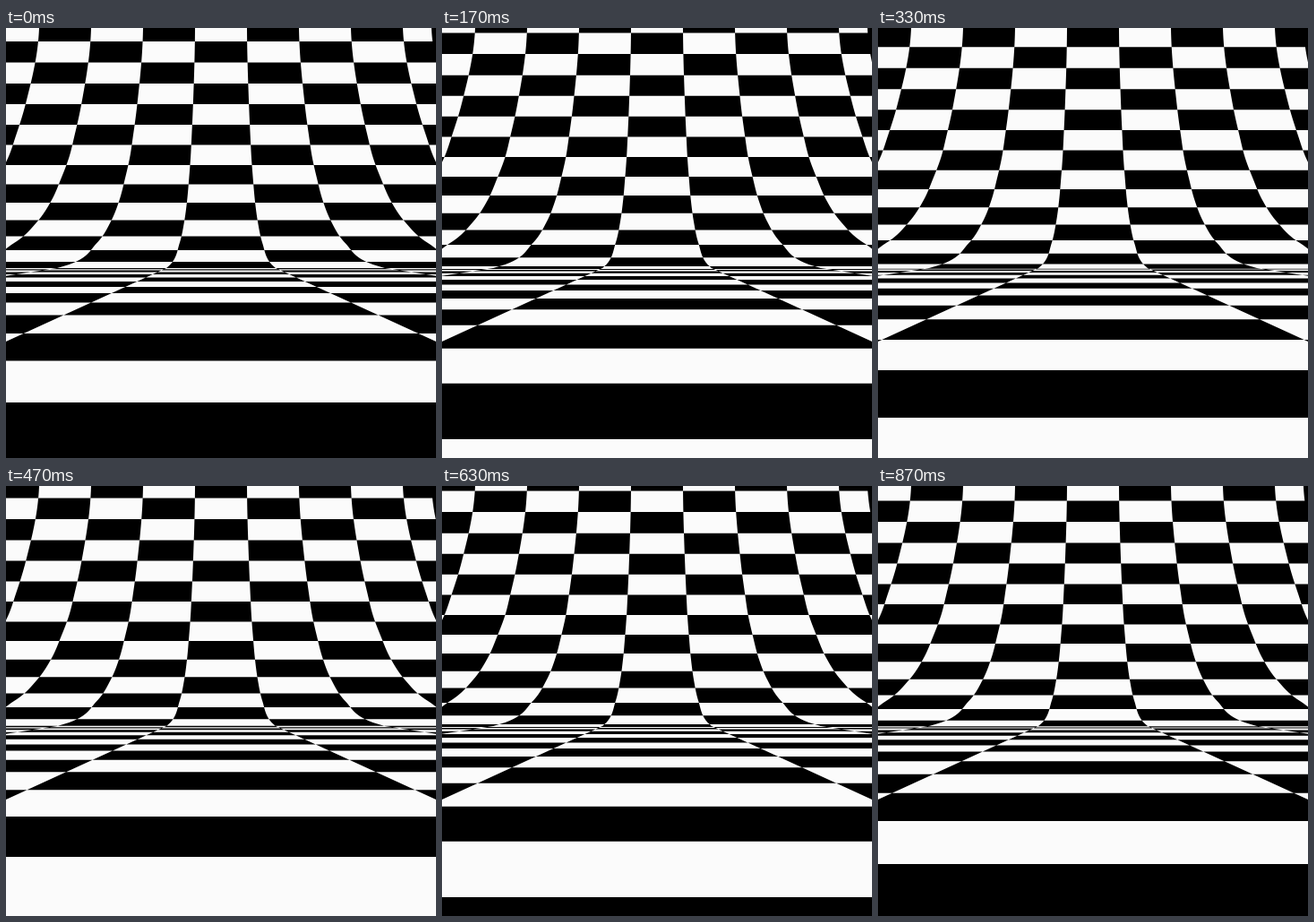
Animation of 480 by 480 pixels, one loop 0.91 s. Source, as an HTML page with a canvas:

```html
<!DOCTYPE html>
<html>
<head>
<meta charset="utf-8">
<style>
html, body { margin: 0; height: 100%; overflow: hidden; background: #000; }
canvas { display: block; }
</style>
</head>
<body>
<canvas id="stage" width="480" height="480"></canvas>
<script>
const SIZE = 480, CENTER = 240, LOOP = 910, STEPS = 27, POSES = 30;
const ctx = document.getElementById('stage').getContext('2d');

// Screen height of each row edge, from the top of the wall to the near floor.
const FIRST_ROW = -28;
const ROW_Y = [
  -32, -8.5, 15, 38.5, 62, 85, 108, 130.5, 153, 174.5, 195, 214.5, 232.5, 248, 261,
  268, 269.3, 270.5, 272.4, 275, 278.5, 283, 289, 296, 306.5, 320.5, 341, 371.5, 418, 491.5, 590
];

// Half a column's width on the wall, every 24 px down.
const WALL_STEP = 24, WALL_END = 264;
const WALL_W = [29, 29.3, 29.9, 30.7, 31.6, 32.7, 33.9, 35.7, 37.8, 41, 46.2, 56.5, 90];

function spline(points, pos) {
  const last = points.length - 1;
  const i = Math.max(0, Math.min(last - 1, Math.floor(pos)));
  const t = pos - i;
  const a = points[Math.max(0, i - 1)], b = points[i];
  const c = points[i + 1], d = points[Math.min(last, i + 2)];
  return b + t * ((c - a) / 2 + t * (a - 2.5 * b + 2 * c - d / 2 + t * (1.5 * (b - c) + (d - a) / 2)));
}

const rowY = row => spline(ROW_Y, row - FIRST_ROW);

function halfWidth(y) {
  if (y < WALL_END) return spline(WALL_W, y / WALL_STEP);
  return Math.max(61 + (y - 268) * 2.183, 56.5 + (y - WALL_END) * 1.1);
}

// Closed strip between two multiples of the half width.
function strip(path, inner, outer) {
  for (let y = 0; y <= SIZE; y += 2) {
    path.lineTo(CENTER + inner * halfWidth(y), y);
  }
  for (let y = SIZE; y >= 0; y -= 2) {
    path.lineTo(CENTER + outer * halfWidth(y), y);
  }
  path.closePath();
}

const columns = new Path2D();
for (const side of [-1, 1]) {
  for (const edge of [1, 5]) strip(columns, side * edge, side * (edge + 2));
}
const beyondSheet = new Path2D();
strip(beyondSheet, 8.1, 12);

function draw(shift) {
  ctx.fillStyle = '#000';
  ctx.fillRect(0, 0, SIZE, SIZE);

  // Even-odd overlap of rows and columns makes the checks.
  const checks = new Path2D(columns);
  for (let row = -27; row <= 3; row += 2) {
    const top = rowY(Math.min(2, row - shift));
    const bottom = rowY(Math.min(2, row + 1 - shift));
    checks.rect(-10, top, SIZE + 20, bottom - top);
  }
  ctx.fillStyle = '#fbfbfb';
  ctx.fill(checks, 'evenodd');

  ctx.fillStyle = '#000';
  ctx.fill(beyondSheet);
}

// 30 poses shown in 27 steps, on a 10 ms clock.
function frame() {
  const tick = Math.floor((performance.now() % LOOP) / 10);
  const step = Math.min(STEPS - 1, Math.floor(tick * 0.3 + 0.15));
  const pose = Math.round(step * 10 / 9);
  draw(2 * pose / POSES);
  requestAnimationFrame(frame);
}
frame();
</script>
</body>
</html>
```
